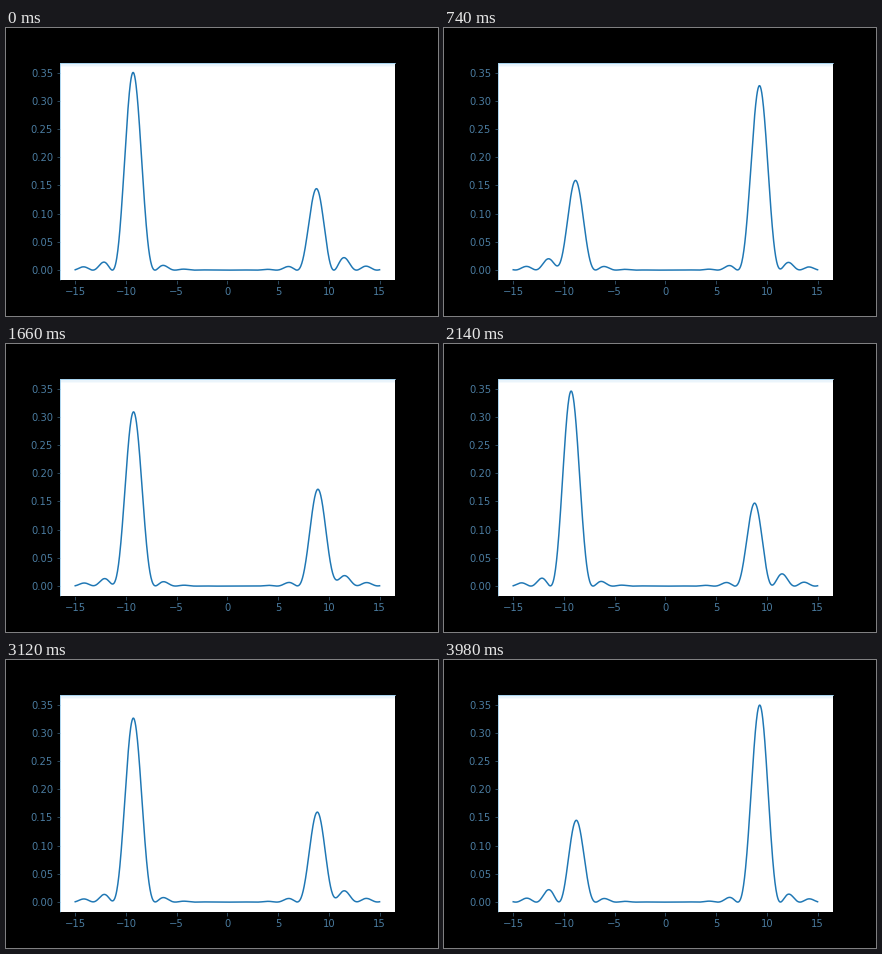
Recreate the animation shown at these times as a matplotlib script. Size 432 px wide and 288 px high, loop 4 s.

```python
import numpy as np
import matplotlib.pyplot as plt
from matplotlib.animation import FuncAnimation
from matplotlib.colors import to_rgb

FRAMES, INTERVAL = 200, 20
DT = 0.025
N_LOW, N_HIGH = 9, 10
C_LOW, C_HIGH = np.sqrt(8) / 3, 1 / 3
LABEL, TICK, EDGE = "#4a7b9f", "#365a73", "#9accec"

plt.rcParams.update({"font.family": "DejaVu Sans", "font.size": 10})


def peak(p, centre):
    return 0.5 * np.sinc((p - centre) / 2)


p = np.linspace(-15, 15, 901)
odd = C_LOW * (peak(p, N_LOW) - peak(p, -N_LOW))
even = C_HIGH * (peak(p, N_HIGH) + peak(p, -N_HIGH))
omega = (N_HIGH**2 - N_LOW**2) / 2


def density(t):
    """Momentum density of two superposed levels at time t."""
    return odd**2 + even**2 - 2 * odd * even * np.cos(omega * t)


fig = plt.figure(figsize=(6, 4), dpi=72, facecolor="black")
ax = fig.add_axes([0.125, 0.125, 0.775, 0.755], facecolor="white")
line, = ax.plot(p, density(0), color="#1f77b4", lw=1.5)

# The limits stay as fitted to the first curve.
ax.set_xlim(ax.get_xlim())
ax.set_ylim(ax.get_ylim())
ax.set_xticks(np.arange(-15, 16, 5))
ax.set_yticks(np.arange(0, 0.36, 0.05))
ax.tick_params(color=TICK, labelcolor=LABEL)
for side, spine in ax.spines.items():
    spine.set_color(EDGE if side in ("left", "top") else "black")

# Soft tint under the top edge.
fade = np.empty((5, 1, 4))
fade[..., :3] = to_rgb(EDGE)
fade[..., 3] = np.linspace(0.4, 0, 5)[:, None]
ax.imshow(fade, extent=(0, 1, 0.977, 1), transform=ax.transAxes,
          aspect="auto", interpolation="nearest", zorder=0)


def update(i):
    line.set_ydata(density(i * DT))
    return line,


anim = FuncAnimation(fig, update, frames=FRAMES, interval=INTERVAL,
                     repeat=True, repeat_delay=0)
plt.show()
```
